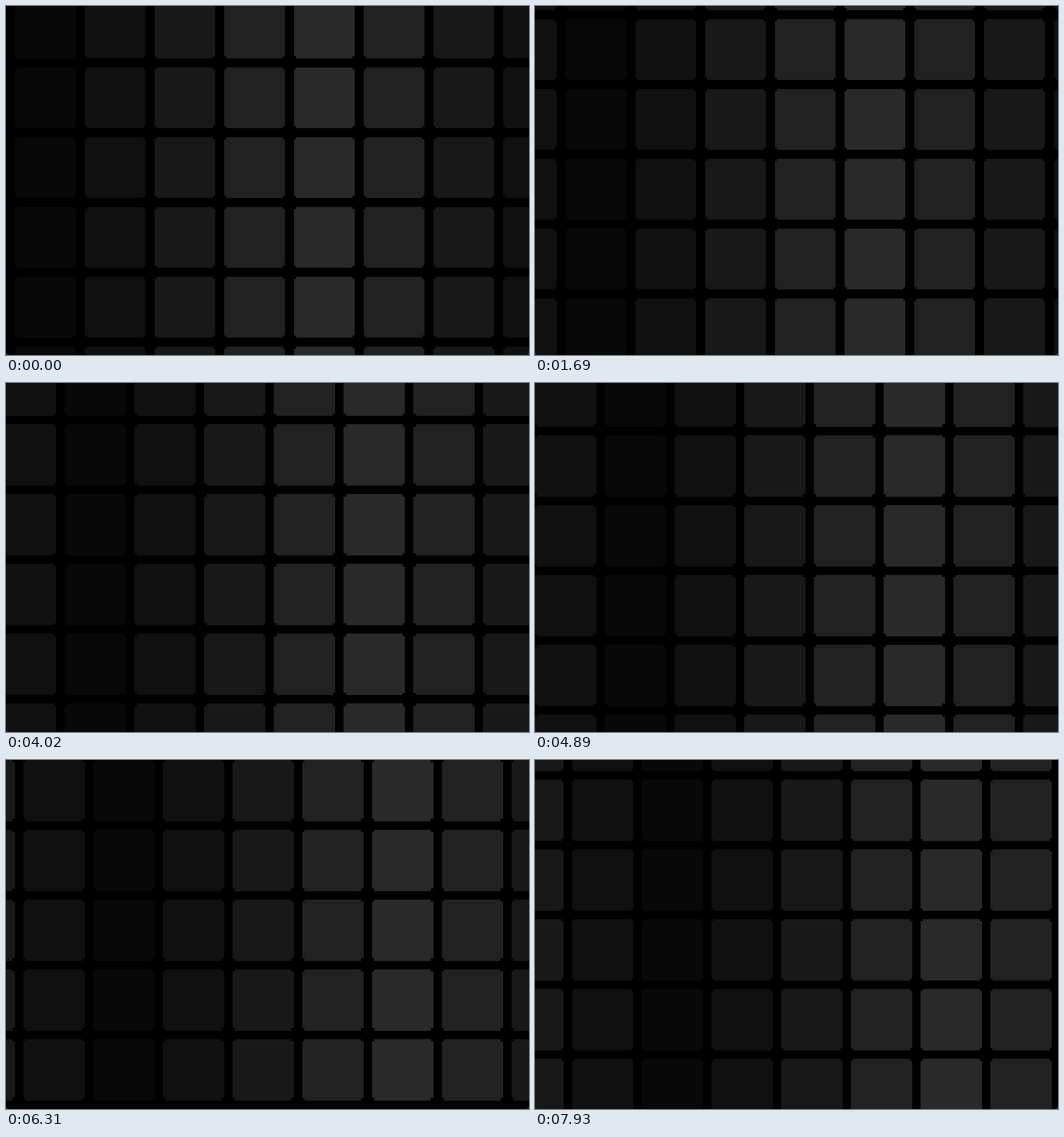
Animation, 750 px wide and 500 px high, one loop 8 s. Source, as an HTML page with a canvas:

```html
<!DOCTYPE html>
<html lang="en">
<head>
<meta charset="utf-8">
<title>Drifting tiles</title>
<style>
  html, body { margin: 0; width: 100%; height: 100%; overflow: hidden; background: #262626; }
  canvas {
    display: block; width: 750px; height: 500px;
    image-rendering: pixelated; border-radius: 0 0 6px 6px;
  }
</style>
</head>
<body>
<canvas id="stage" width="240" height="160"></canvas>
<script>
const stage = document.getElementById('stage');
const ctx = stage.getContext('2d');
const LOOP = 8000, FIRST = 80, STEP = 177.9;
const PITCH = 32, SIZE = 28, GAP = PITCH - SIZE;

// One whole pixel down and right per step
const driftAt = t => Math.floor((t - FIRST) / STEP) + 1;

// Greys rise and fall over eight columns, as 5-bit levels 1 to 5
function shade(col) {
  const level = 5 - Math.abs(4 - (col + 8) % 8);
  const v = level << 3 | level >> 2;
  return `rgb(${v},${v},${v})`;
}

// Square with its four corner pixels cut off
function tile(x, y) {
  ctx.fillRect(x + 1, y, SIZE - 2, SIZE);
  ctx.fillRect(x, y + 1, SIZE, SIZE - 2);
}

function draw(drift) {
  ctx.fillStyle = '#000';
  ctx.fillRect(0, 0, stage.width, stage.height);
  for (let col = -2; col < 8; col++) {
    ctx.fillStyle = shade(col);
    for (let row = -2; row < 6; row++) {
      tile(drift + GAP + col * PITCH, drift - GAP + row * PITCH);
    }
  }
}

function frame(now) {
  draw(driftAt(Math.max(0, now) % LOOP));
  requestAnimationFrame(frame);
}

draw(0);
requestAnimationFrame(frame);
</script>
</body>
</html>
```
